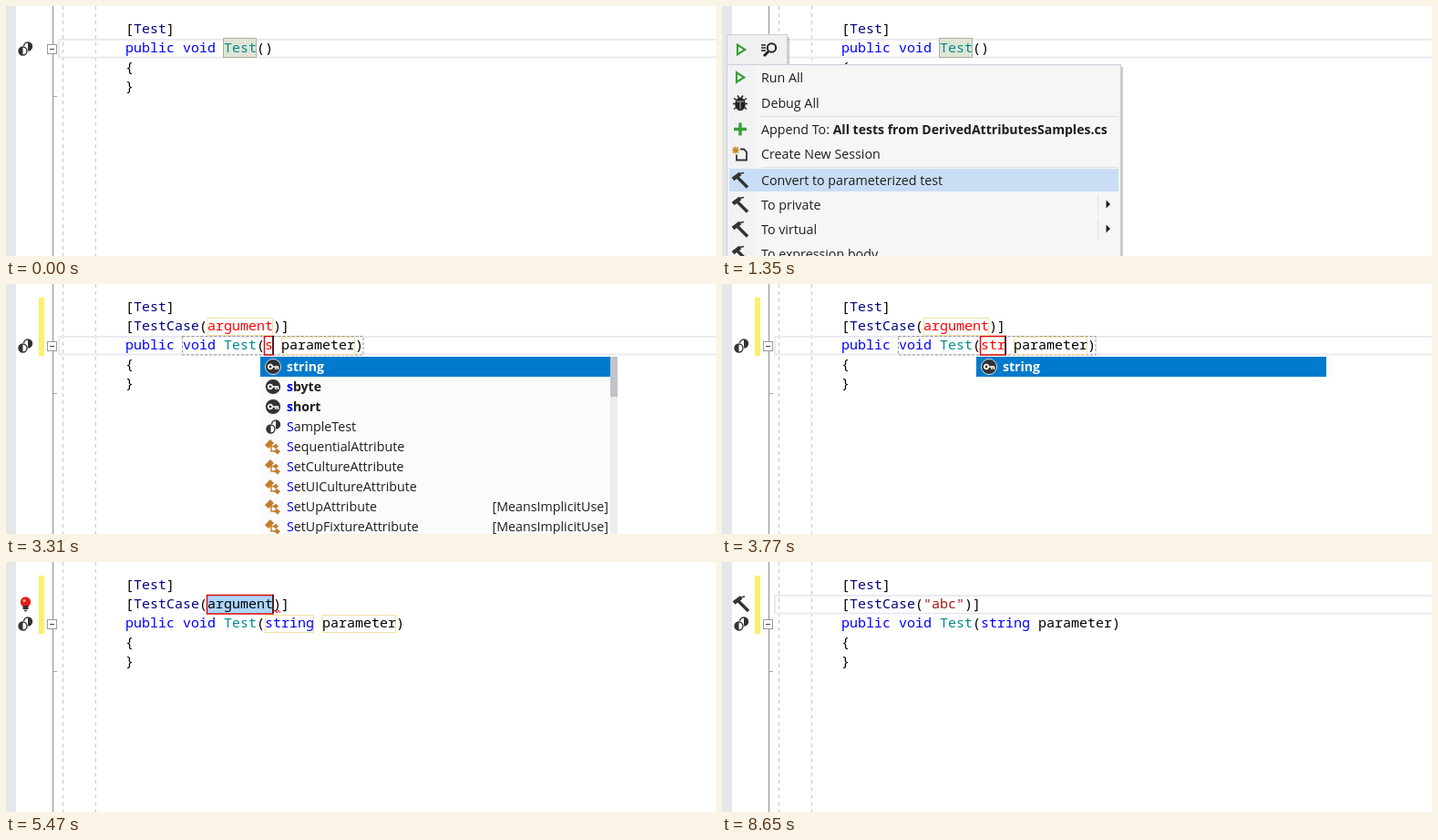
Animation of 779 by 275 pixels, one loop 8880 ms. Source, as an HTML page:

```html
<!DOCTYPE html>
<html lang="en">
<head>
<meta charset="utf-8">
<title>Parameterized test</title>
<style>
html, body { margin: 0; width: 100%; height: 100%; overflow: hidden; background: #fff; }
svg { display: block; }
text { white-space: pre; fill: #000; }
.code { font: 15px "Noto Sans Mono", "Liberation Mono", monospace; font-variant-ligatures: none; }
.ui { font: 14.25px "Open Sans", "Noto Sans", sans-serif; fill: #1e1e1e; }
.b { font-weight: 700; font-size: 14.05px; }
.kw { fill: #00f; }
.fn { fill: #008b8b; }
.attr { fill: #000080; }
.str { fill: #a31515; }
.err { fill: #f00; }
.hot { fill: none; stroke: #e00b0b; stroke-width: 1.5; }
.slot { fill: none; stroke: #efe3a2; }
.usage { fill: #e0e5d5; stroke: #acb0a3; }
.sel { fill: #add6ff; }
.dash { fill: none; stroke: #999; stroke-dasharray: 3 2; }
.wave { fill: none; stroke: #f00; }
.line { fill: none; stroke: #eaeaf2; stroke-width: 2; }
</style>
</head>
<body>
<svg id="stage" width="779" height="275" viewBox="0 0 779 275">
  <defs>
    <g id="test">
      <circle cx="3" cy="-2.500" r="4.500" fill="#fff" stroke="#333" stroke-width="1.400"/>
      <path d="M3-7a4.500 4.500 0 0 1 0 9z" fill="#333"/>
      <circle cx="-2.500" cy="2.500" r="5.800" fill="#fff"/>
      <circle cx="-2.500" cy="2.500" r="4.500" fill="#fff" stroke="#333" stroke-width="1.400"/>
      <path d="M-2.500-2a4.500 4.500 0 0 0 0 9z" fill="#333"/>
    </g>
    <g id="play"><path d="M-4-5.200L4.200 0L-4 5.200z" fill="#fff" stroke="#38a038" stroke-width="2.200"/></g>
    <g id="hammer" fill="none" stroke="#333">
      <path d="M-3-3L8 8" stroke-width="3.400"/>
      <path d="M-8-1L0-7" stroke-width="4.400"/>
      <path d="M-1-7L4-8" stroke-width="1.600"/>
    </g>
    <g id="bug" fill="none" stroke="#222" stroke-width="1.500">
      <path d="M-8 1H8M-7-5L-3-2M7-5L3-2M-7 7L-3 4M7 7L3 4M-3-8L-1-5M3-8L1-5"/>
      <ellipse cy="1.500" rx="5" ry="6.500" fill="#222"/>
      <path d="M-4-1.500H4M0-1V7" stroke="#ddd" stroke-width=".8"/>
    </g>
    <g id="plus"><path d="M-7 0H7M0-7V7" stroke="#38a038" stroke-width="3.400"/></g>
    <g id="session" fill="none">
      <path d="M0-5H4L7-2V7H-4V1" stroke="#333" stroke-width="1.800"/>
      <path d="M-9-4H-1M-5-8V0M-8-7L-2-1M-2-7L-8-1" stroke="#c88420" stroke-width="1.400"/>
    </g>
    <g id="find" fill="none" stroke="#222">
      <circle cx="3.500" cy="-2" r="4.700" stroke-width="2"/>
      <path d="M0 2L-5 7" stroke-width="2.800"/>
      <path d="M-8-5H-3M-8-2H-3M-8 1H-3" stroke-width="1.400"/>
    </g>
    <g id="bulb">
      <circle cy="-2" r="5.700" fill="#e0201b"/>
      <path d="M-3 2H3V6H-3z" fill="#333"/>
      <path d="M-1.500 7.500H1.500" stroke="#333" stroke-width="1.500"/>
      <circle cx="-1.500" cy="-3.500" r="1.500" fill="#ffb0a8"/>
    </g>
    <g id="key">
      <circle r="8.500" fill="#333" stroke="#fff" stroke-width=".8"/>
      <circle cx="-3" r="2.300" fill="none" stroke="#fff" stroke-width="1.700"/>
      <path d="M-1 0H6M3 0V3M5.500 0V3" fill="none" stroke="#fff" stroke-width="1.500"/>
    </g>
    <g id="class" fill="#c27d2a">
      <path d="M-9-2L-3-8L1-4L-5 2z"/>
      <path d="M3-3.500L6-.5L3 2.500L0-.5zM4 2L8 5L5 8.500L1 5z"/>
      <path d="M-3-.5H3M-2 0V5H4" fill="none" stroke="#c27d2a" stroke-width="1.400"/>
    </g>
  </defs>
</svg>
<script>
const LOOP = 8880, X0 = 131, CW = 9;
const stage = document.getElementById('stage');
const colX = c => X0 + c * CW;
const rowY = r => Math.round(15 + 21.2 * r);

// Wraps markup in a group visible during the given "from-to" spans.
const at = (spans, body) => `<g data-on="${spans}">${body}</g>`;
const rect = (x, y, w, h, attrs) => `<rect x="${x}" y="${y}" width="${w}" height="${h}" ${attrs}/>`;
const icon = (id, x, y) => `<use href="#${id}" x="${x}" y="${y}"/>`;
const ui = (x, y, s, cls = '') => `<text class="ui ${cls}" x="${x}" y="${y + 5}">${s}</text>`;
const span = (cls, s) => `<tspan class="${cls}">${s}</tspan>`;
const code = (row, s) => `<text class="code" x="${X0}" y="${Math.floor(30 + 21.2 * row)}">${s}</text>`;
const box = (col, row, len, cls) => {
  const slot = cls === 'slot';
  return rect(colX(col) - (slot ? -0.5 : 0.5), rowY(row) + (slot ? 1.5 : 0.5),
    len * CW + (slot ? -1 : 0.5), slot ? 19 : 20.5, `class="${cls}"`);
};
const picked = (col, row, len) => box(col, row, len, 'sel') + box(col, row, len, 'hot');
const caret = (col, row) => rect(colX(col) - 0.7, rowY(row) - 0.3, 1.4, 20.5, 'fill="#111"');
const current = row => rect(58, rowY(row) + 1, 730, 19.5, 'class="line"');
const wave = col => `<path class="wave" d="M${colX(col)} 56l2-3l2 3l2-3l2 3"/>`;

const fold = row => {
  const y = rowY(row) + 6.5, end = rowY(row + 3) - 0.5;
  return rect(45.5, y, 10, 10, 'fill="#fff" stroke="#999"') +
    `<path d="M48 ${y + 5}H53" stroke="#444"/><path d="M51 ${end}H56" stroke="#a5a5a5"/>` +
    icon('test', 21, y + 4.5);
};

const frame = rect(0, 0, 11, 275, 'fill="#e6e7e8"') +
  '<path d="M51.500 0V275" stroke="#a0a0a0" stroke-width="1.400"/>' +
  '<path d="M62.500 0V275M98.500 0V275" stroke="#c8c8c8" stroke-dasharray="4 4"/>' +
  code(0, `[${span('attr', 'Test')}]`);

const head = span('kw', 'public') + ' ' + span('kw', 'void') + ' ' + span('fn', 'Test');

function before() {
  return at('0-1830', current(1) + rect(238.5, 35.5, 36, 21, 'class="usage"') + fold(1) +
    code(1, head + '()') + code(2, '{') + code(3, '}')) +
    at('130-430', caret(13, 1));
}

function signature() {
  const typed = [['s', 3150, 3460], ['st', 3460, 3620], ['str', 3620, 3850],
    ['stri', 3850, 3930], ['strin', 3930, 4010], ['string', 4010, 4380]];
  const sig = (cls, type) => code(2, `${head}(${span(cls, type)} parameter)`);
  let out = at('1830-3150', picked(17, 2, 6) + box(24, 2, 9, 'slot') + sig('kw', 'object')) +
    at('1830-2300 2850-3150', caret(23, 2)) +
    at('3150-4380', current(2));
  for (const [s, from, to] of typed) {
    const n = s.length;
    out += at(`${from}-${to}`, box(7, 2, 21 + n, 'dash') + box(18 + n, 2, 9, 'slot') +
      box(17, 2, n, 'hot') + sig(n < 6 ? 'err' : 'kw', s) + caret(17 + n, 2));
  }
  return out +
    at('4380-7100', box(17, 2, 6, 'slot')) +
    at('4380-5230', picked(24, 2, 9)) +
    at('5230-7100', box(24, 2, 9, 'slot')) +
    at('4380-8880', sig('kw', 'string')) +
    at('4380-5080', caret(33, 2));
}

function attribute() {
  const attr = (cls, s) => code(1, `[${span('attr', 'TestCase')}(${span(cls, s)})]`);
  let out = at('1830-5230', box(10, 1, 8, 'slot')) +
    at('1830-4550', attr('err', 'argument')) +
    at('5230-6020', picked(10, 1, 8)) +
    at('4550-6020', attr('', 'argument') + wave(18)) +
    at('5230-5540', caret(18, 1)) +
    at('6020-8880', current(1));
  ['', 'a', 'ab', 'abc'].forEach((s, i) => {
    const from = 6020 + i * 140, to = i < 3 ? from + 140 : 7020;
    out += at(`${from}-${to}`, box(10, 1, i + 2, 'hot') + attr('str', `"${s}"`) + caret(11 + i, 1));
  });
  return out + at('6560-7020', wave(15)) +
    at('7020-8880', attr('str', '"abc"')) +
    at('7020-7180 7560-8650', caret(14, 1)) +
    at('5470-7100', icon('bulb', 21.5, 46)) +
    at('7180-8880', icon('hammer', 21, 46));
}

function after() {
  return at('1830-8880', rect(36, 15, 6, 64, 'fill="#fdef6b"') + fold(2) + code(3, '{') + code(4, '}')) +
    signature() + attribute();
}

function menu() {
  const items = [[79, 'play', 'Run All'], [107, 'bug', 'Debug All'],
    [136, 'plus', 'Append To: ' + span('b', 'All tests from DerivedAttributesSamples.cs')],
    [163, 'session', 'Create New Session'], [192, 'hammer', 'Convert to parameterized test'],
    [219, 'hammer', 'To private'], [246, 'hammer', 'To virtual'], [273, 'hammer', 'To expression body']];
  const picks = [510, 970, 1050, 1200, 1350, 1750];
  const edge = 'fill="#f0f0f1" stroke="#cccedb"', shade = 'fill="#000" opacity=".2"';
  let out = rect(8, 34, 66, 32, shade) + rect(5.5, 31.5, 66, 34, edge) +
    icon('play', 21, 48) + icon('find', 51, 48) +
    rect(8, 67, 432, 215, shade) + rect(5.5, 64.5, 432, 220, edge) +
    rect(6, 66, 31, 212, 'fill="#f2f2f4"') + rect(37, 66, 399, 212, 'fill="#f6f6f6"') +
    '<path d="M43 121.500H435M43 177.500H435" stroke="#e0e0e2"/>';
  items.slice(0, 5).forEach(([y], i) => {
    out += at(`${picks[i]}-${picks[i + 1]}`, rect(8, y - 13, 427, 25, 'fill="#c9def5"'));
  });
  for (const [y, id, s] of items) out += icon(id, 20, y - 0.5) + ui(43, y, s);
  for (const y of [218, 245])
    out += `<path d="M412.500 ${y - 11}v23" stroke="#e2e2e2"/><path d="M421.500 ${y - 4.5}l4.500 4.500l-4.500 4.500z" fill="#1e1e1e"/>`;
  return at('430-1750', `<g id="menu">${out}</g>`);
}

function completion(on, n, list) {
  const h = list.length * 22, tall = h > 100;
  let out = rect(279, 80, 392, h, 'fill="#fbfbfb"') + rect(279, 80, 384, 22, 'fill="#007acc"');
  if (tall) out += rect(663, 80, 8, h, 'fill="#ededf0"') + rect(663, 80, 8, 44, 'fill="#c2c3c9"');
  list.forEach((s, i) => {
    const y = 91 + i * 22, word = /^[a-z]/.test(s);
    const hit = i ? span('kw', s.slice(0, n)) + s.slice(n) : `<tspan fill="#fff">${s}</tspan>`;
    out += icon(word ? 'key' : s === 'SampleTest' ? 'test' : 'class', 293, y) + ui(308, y, hit, word ? 'b' : '');
    if (/^SetUp/.test(s)) out += ui(533.5, y, '[MeansImplicitUse]');
  });
  return at(on, out);
}

const names = ['string', 'sbyte', 'short', 'SampleTest', 'SequentialAttribute', 'SetCultureAttribute',
  'SetUICultureAttribute', 'SetUpAttribute', 'SetUpFixtureAttribute'];

stage.insertAdjacentHTML('beforeend', frame + before() + after() +
  completion('3230-3540', 1, names) +
  completion('3540-3700', 1, ['string', 'SampleTest']) +
  completion('3700-4150', 3, ['string']) +
  menu());

const parts = [...stage.querySelectorAll('[data-on]')].map(el => ({
  el, spans: el.dataset.on.split(' ').map(s => s.split('-').map(Number))
}));
const menuEl = document.getElementById('menu');

function draw(t) {
  for (const { el, spans } of parts)
    el.style.display = spans.some(([a, b]) => t >= a && t < b) ? '' : 'none';
  menuEl.style.opacity = t < 510 ? 0.5 : 1;
}

const start = performance.now();
function tick() {
  draw((performance.now() - start) % LOOP);
  requestAnimationFrame(tick);
}
tick();
</script>
</body>
</html>
```
